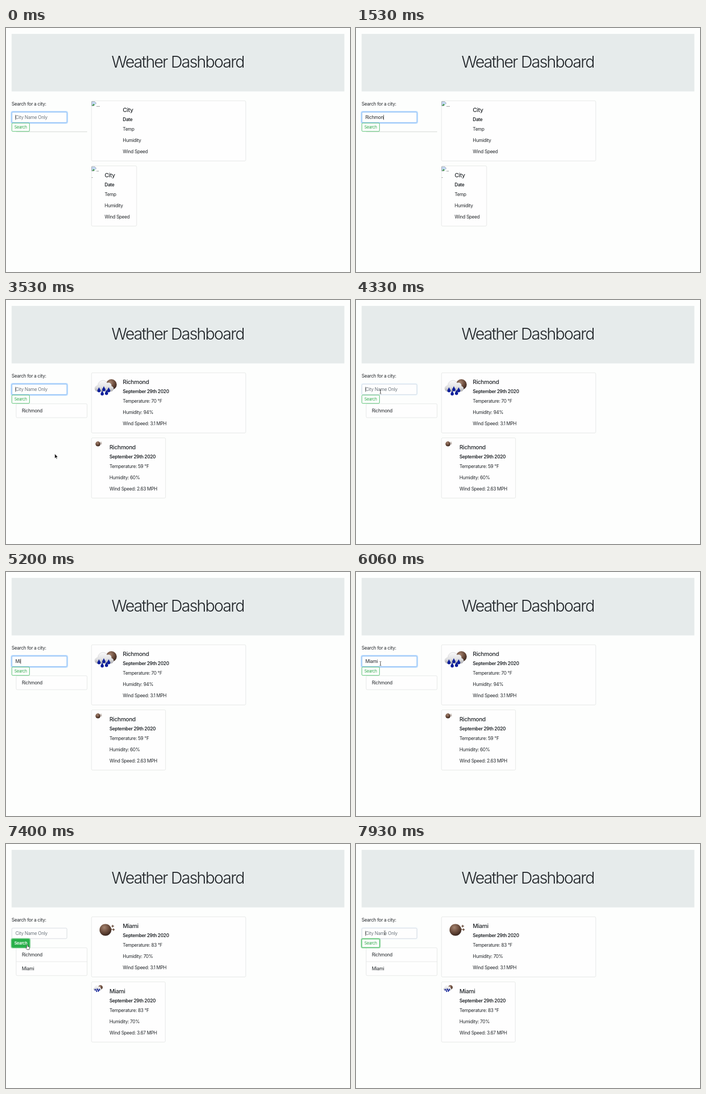
These frames come from a looping animation (640 by 456 pixels, 8 s). An HTML page:

```html
<!DOCTYPE html>
<html lang="en">
<head>
<meta charset="utf-8">
<title>Weather Dashboard</title>
<style>
  html, body { margin: 0; width: 100%; height: 100%; overflow: hidden; background: #fdfefd; }
  svg { display: block; width: 640px; height: 456px; }
  text { font: 400 8.56px Inter, Roboto, sans-serif; font-optical-sizing: none; letter-spacing: -.03em; fill: #212529; white-space: pre; }
  .title { font-size: 30px; font-weight: 300; letter-spacing: -.06em; text-anchor: middle; }
  .city { font-size: 10.7px; font-weight: 500; }
  .date { font-weight: 600; }
  .small { font-size: 7.5px; }
  .box { fill: #fefefe; stroke: #e0e2e1; stroke-width: .8; }
</style>
</head>
<body>
<svg viewBox="0 0 640 456">
  <defs>
    <radialGradient id="moonFill" cx=".4" cy=".3" r=".75">
      <stop offset="0" stop-color="#a58470"/><stop offset=".55" stop-color="#694a3a"/><stop offset="1" stop-color="#33211a"/>
    </radialGradient>
    <linearGradient id="cloudFill" x2="0" y2="1">
      <stop offset="0" stop-color="#fbfbfb"/><stop offset=".6" stop-color="#e2e2e4"/><stop offset="1" stop-color="#a9a9ad"/>
    </linearGradient>
    <path id="drop" d="M0-5C1 -2 3 -.5 3 1.6A3 3 0 0 1-3 1.6C-3-.5-1-2 0-5Z" fill="#10209a"/>
    <path id="star" d="M0-3L.9-.9 3 0 .9.9 0 3-.9.9-3 0-.9-.9Z" fill="#6b5040"/>
    <g id="night">
      <circle cx="-1" cy="-2.5" r="11" fill="url(#moonFill)"/>
      <use href="#star" x="12.5" y="-9.5"/>
      <use href="#star" x="14" y="-3"/>
      <use href="#star" transform="translate(10.5 -3.5) scale(.5)"/>
    </g>
    <g id="rain">
      <circle cx="10" cy="-5" r="10" fill="url(#moonFill)"/>
      <path d="M-16 8C-23 7-22-3-15-3C-15-12-3-17 2-8C7-10 11-6 10-2C16-1 15 8 9 8Z" fill="url(#cloudFill)" stroke="#c9c9cc" stroke-width=".6"/>
      <use href="#drop" x="-13" y="5"/>
      <use href="#drop" x="-4" y="3"/>
      <use href="#drop" x="5" y="5"/>
      <use href="#drop" x="-7" y="11"/>
      <use href="#drop" x="1" y="10"/>
    </g>
    <g id="missing">
      <path d="M.5.5H6L8.5 3V8.5H.5Z" fill="#c5d9f4" stroke="#8a9098" stroke-width=".7"/>
      <path d="M1 8L4 4.5 6 6.5 4.5 8.2Z" fill="#4a9b4b"/>
      <path d="M4 9L9 4.5V9Z" fill="#fefefe"/>
    </g>
  </defs>
  <rect width="640" height="456" fill="#fdfefd"/>
  <rect x="10.5" y="11" width="619" height="107.5" fill="#e6ebeb"/>
  <text class="title" x="319.5" y="73.5">Weather Dashboard</text>
  <text x="10.5" y="145">Search for a city:</text>

  <path id="emptyList" d="M19 193.9H151" stroke="#d3d8d3" stroke-width="1"/>
  <g id="list">
    <rect id="listBox" class="box" x="18.9" y="193.9" width="132" height="26" rx="2"/>
    <path id="listRule" d="M19 219.9H151" stroke="#e0e2e1" stroke-width=".8"/>
    <text x="29.5" y="210">Richmond</text>
    <text id="secondItem" x="29.5" y="236">Miami</text>
  </g>

  <rect id="glow" x="9.9" y="156.2" width="104.4" height="21.6" rx="2.8" fill="none" stroke="#bfdeff" stroke-width="2.2"/>
  <rect x="10.9" y="157.2" width="102.4" height="19.6" rx="2" fill="#fefefe" stroke="#ced4da" stroke-width=".8"/>
  <rect id="focusLine" x="10.9" y="157.2" width="102.4" height="19.6" rx="2" fill="none" stroke="#80bdff"/>
  <text id="typed" x="17.6" y="170"></text>
  <text id="hint" x="17.6" y="170" style="fill:#6c757d">City Name Only</text>
  <rect id="caret" y="162.4" width=".8" height="9.2" fill="#222"/>

  <rect id="ring" x="10" y="176.8" width="34.6" height="17.2" rx="2.4" fill="none" stroke="#93d7a2" stroke-width="2.2"/>
  <rect id="button" x="10.9" y="177.7" width="32.8" height="15.5" rx="1.6" stroke="#28b04a" stroke-width=".8"/>
  <text id="buttonText" class="small" x="15.4" y="188">Search</text>

  <g id="cards"></g>

  <g id="pointer">
    <path id="beam" d="M-1.6-3.8Q0-3.8 0-2.8Q0-3.8 1.6-3.8M0-2.8V2.8M-1.6 3.8Q0 3.8 0 2.8Q0 3.8 1.6 3.8M-.8.9H.8" fill="none" stroke="#444" stroke-width=".8"/>
    <path id="hand" d="M-.9.3Q0-.7.9.3V3L3.6 3.6Q4.6 4 4.4 5.5L3.6 8.7H-.4L-2.6 5.6Q-2.6 4.3-.9 5.2Z" fill="#fff" stroke="#222" stroke-width=".7"/>
    <path id="arrow" d="M0 0V8.6L2 6.8 3.3 9.8 4.6 9.2 3.3 6.4H6Z" fill="#111" stroke="#fff" stroke-width=".6"/>
  </g>
</svg>
<script>
const LOOP = 8000;
const el = id => document.getElementById(id);
const show = (node, on) => node.setAttribute('display', on ? 'inline' : 'none');
const attrs = (node, values) => Object.entries(values).forEach(([k, v]) => node.setAttribute(k, v));
const clamp = v => Math.max(0, Math.min(1, v));
const at = (steps, t) => steps.filter(step => step[0] <= t).pop();

const typing = [[0, '']];
const typeWord = (word, times) => times.forEach((t, i) => typing.push([t, word.slice(0, i + 1)]));
typeWord('Richmond', [600, 745, 890, 1035, 1180, 1325, 1470, 1615]);
typing.push([2200, '']);
typeWord('Miami', [4930, 5200, 5260, 5400, 5600]);
typing.push([7060, '']);

const caretOn = [[0, 460], [600, 2115], [2200, 2860], [3360, 3660], [4310, 4730], [4930, 6060], [6560, 6900], [7920, 8000]];
const focusChanges = [[-999, 1], [3660, 0], [4310, 1], [6900, 0], [7920, 1]];
const ringChanges = [[-999, 0], [6900, 1], [7920, 0]];
const pointerShown = [[2860, 4930], [6060, 8000]];
const pointerPath = [
  [2860, 100, 306], [3660, 90, 286], [3760, 90, 286], [4270, 45.5, 171.5], [6200, 45.5, 171.2],
  [6680, 39.5, 188.6], [7400, 39.5, 188.6], [7880, 53.5, 166.2]
];

const weather = (city, temp, humidity, wind) =>
  [city, 'September 29th 2020', `Temperature: ${temp} °F`, `Humidity: ${humidity}%`, `Wind Speed: ${wind} MPH`];
const blank = ['City', 'Date', 'Temp', 'Humidity', 'Wind Speed'];
const reports = [
  [0, blank, blank, null, null],
  [2270, weather('Richmond', 70, 94, 3.1), weather('Richmond', 59, 60, 2.63), 'rain', 'night'],
  [7100, weather('Miami', 83, 70, 3.1), weather('Miami', 83, 70, 3.67), 'night', 'rain']
];

const inside = (ranges, t) => ranges.some(([a, b]) => t >= a && t < b);

// Value of a 150 ms fade between the listed on/off states.
function fade(changes, t) {
  const [start, goal] = at(changes, t);
  const p = clamp((t - start) / 150);
  return goal ? p : 1 - p;
}

function pointerAt(t) {
  const i = Math.max(0, pointerPath.filter(p => p[0] <= t).length - 1);
  const [t0, x0, y0] = pointerPath[i];
  const [t1, x1, y1] = pointerPath[i + 1] || [t0 + 1, x0, y0];
  const p = clamp((t - t0) / (t1 - t0));
  const e = p * p * (3 - 2 * p);
  return [x0 + (x1 - x0) * e, y0 + (y1 - y0) * e];
}

function card(top, width, textX, lines, icon, iconPlace, alt) {
  const classes = ['city', 'date', '', '', ''];
  const offsets = [21.2, 37.9, 56.1, 77.3, 98.4];
  const rows = lines.map((line, i) =>
    `<text class="${classes[i]}" x="${textX}" y="${top + offsets[i]}">${line}</text>`).join('');
  const picture = icon ? `<use href="#${icon}" transform="${iconPlace}"/>`
    : `<use href="#missing" x="159" y="${top + 1}"/>${alt}`;
  return `<rect class="box" x="159" y="${top}" width="${width}" height="112.5" rx="2"/>${picture}${rows}`;
}

let shownReport;
function drawCards(report) {
  if (report === shownReport) return;
  shownReport = report;
  const [, today, later, todayIcon, laterIcon] = report;
  const width = !laterIcon ? 84 : laterIcon === 'night' ? 137.8 : 137.4;
  el('cards').innerHTML =
    card(136, 287, 217.3, today, todayIcon, 'translate(186 163)', '<text x="168" y="147">...</text>') +
    card(257.7, width, laterIcon ? 192.5 : 183.5, later, laterIcon, 'translate(171.5 270) scale(.42)',
      '<text x="168" y="268">..</text><text x="159" y="280">.</text>');
}

function drawPointer(t) {
  const [x, y] = pointerAt(t);
  const visible = inside(pointerShown, t);
  const overInput = x > 10 && x < 114 && y > 157 && y < 177.5;
  const overButton = x > 10 && x < 44 && y >= 177.5 && y < 193.5;
  show(el('pointer'), visible);
  show(el('beam'), overInput);
  show(el('hand'), overButton);
  show(el('arrow'), !overInput && !overButton);
  el('pointer').setAttribute('transform', `translate(${x} ${y})`);
  return visible && overButton;
}

function render(t) {
  const text = at(typing, t)[1];
  el('typed').textContent = text;
  show(el('hint'), !text);
  show(el('caret'), inside(caretOn, t));
  el('caret').setAttribute('x', 17.5 + (text ? el('typed').getComputedTextLength() : 0));

  const focus = fade(focusChanges, t);
  el('glow').setAttribute('opacity', focus);
  el('focusLine').setAttribute('opacity', focus);
  el('ring').setAttribute('opacity', fade(ringChanges, t));

  const items = (t >= 2200) + (t >= 7060);
  show(el('emptyList'), !items);
  show(el('list'), items);
  show(el('listRule'), items > 1);
  show(el('secondItem'), items > 1);
  el('listBox').setAttribute('height', 26 * Math.max(1, items));
  drawCards(at(reports, t));

  const hover = drawPointer(t);
  el('button').setAttribute('fill', hover ? '#28b04a' : '#fefefe');
  attrs(el('buttonText'), { style: hover ? 'fill:#fff;font-weight:600' : 'fill:#28a745' });
}

const start = performance.now();
function tick() {
  render((performance.now() - start) % LOOP);
  requestAnimationFrame(tick);
}
tick();
</script>
</body>
</html>
```
